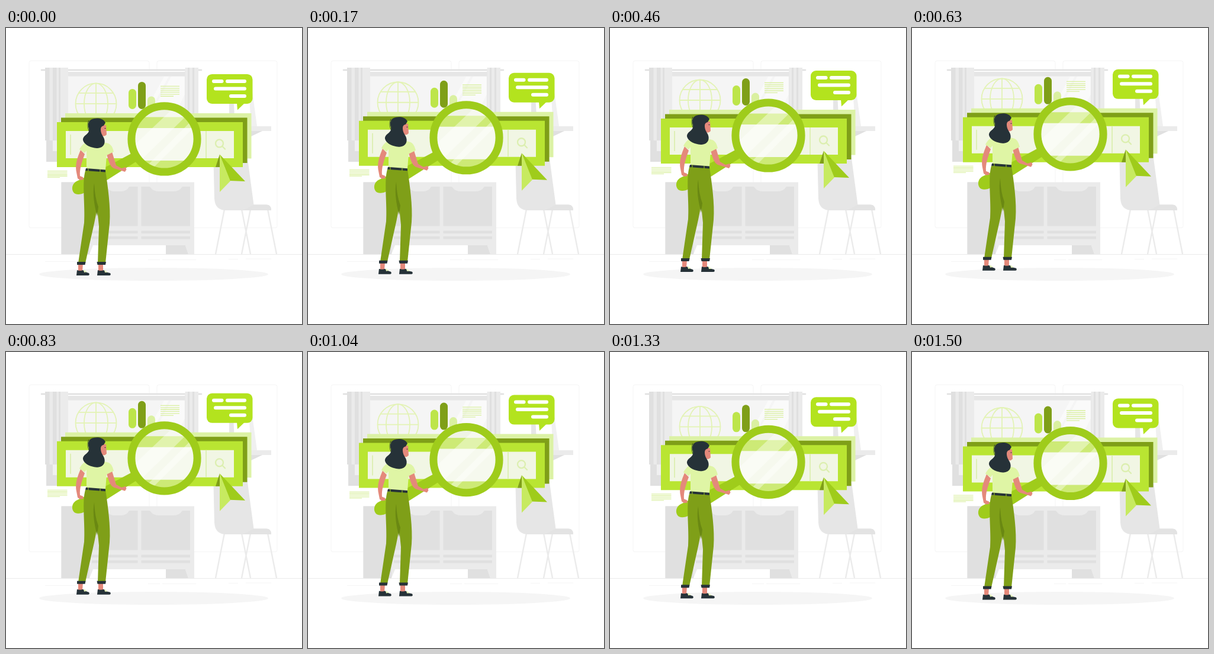
An HTML page for the animation above (1.54 s loop, 500x500 px).

```html
<!DOCTYPE html>
<html lang="en">
<head>
<meta charset="utf-8">
<title>Search illustration</title>
<style>
html, body { margin: 0; width: 100%; height: 100%; overflow: hidden; background: #fff; }
svg { display: block; width: 100vw; height: 100vh; }
</style>
</head>
<body>
<svg viewBox="0 0 500 500">
  <defs>
    <clipPath id="lens"><circle cx="267.5" cy="187.5" r="50"/></clipPath>
  </defs>

  <g id="room">
    <g fill="none" stroke="#f5f5f5">
      <rect x="39" y="55.5" width="203" height="282" rx="3"/>
      <rect x="255" y="55.5" width="203" height="282" rx="3"/>
      <path d="M66 394.5h52M240 391.5h20M264 391.5h57M376 390.5h16M405 390h43"/>
    </g>
    <path d="M0 382.5H500" stroke="#ebebeb"/>

    <g id="window">
      <path d="M68 73H325V226H68z" fill="#e0e0e0"/>
      <path d="M79 190h24v18H79z" fill="#f0f0f0"/>
      <path d="M105 73H302V82H105z" fill="#e6e6e6"/>
      <path d="M105 81.500H302V220H105z" fill="#f5f5f5"/>
      <path d="M267 82h8l-60 110h-8zM279 82h23v30l-40 80h-43z" fill="#fafafa"/>
      <path d="M105 72.500H302V74H105z" fill="#fff"/>
      <path d="M60 71H330" stroke="#e0e0e0" stroke-width="2.600" stroke-linecap="round"/>
      <path d="M66 67h39v123H66zM302.500 67H325v123h-22.500z" fill="#ebebeb"/>
      <path d="M66 67h7.500v123H66zM79 67h6.500v123H79zM89 67h3v123h-3zM307 67h3v123h-3zM315 67h3v123h-3z" fill="#e0e0e0"/>
    </g>

    <g id="shelf">
      <path d="M377 110h7l2 40h-9z" fill="#e6e6e6"/>
      <path d="M410 100h5l9 66h-10z" fill="#f0f0f0"/>
      <path d="M405 166h43v8h-43z" fill="#ebebeb"/>
      <path d="M405 174h28l-19 9h-9z" fill="#e0e0e0"/>
    </g>

    <g id="cabinet">
      <path d="M93.500 260.500H318V382h-10l-5-15H147l-6 15H93.500z" fill="#ebebeb"/>
      <path d="M93.500 260.500H141V382H93.500zM270 367h33l5 15h-38z" fill="#e0e0e0"/>
      <path d="M141 268h28q5 8 14 8h11q10 0 14-8h14.500v66.500H141zM228.500 268H243q5 8 15 8h25q10 0 15-8h13v66.500h-82.500z" fill="#e0e0e0"/>
      <path d="M145 342.500h77.500v4.500H145zM145 352h77.500v4.500H145zM228.500 342.500H311v4.500h-82.500zM228.500 352H311v4.500h-82.500z" fill="#e0e0e0"/>
    </g>

    <g id="chair">
      <path d="M369 306L354 382M398 306L413 382M413 306L398 382M442 306L457 382" stroke="#ebebeb" stroke-width="2.400"/>
      <path d="M350 205H406L418.500 298.500H440q8 0 8 9.500H372Q353 308 352 288z" fill="#e6e6e6"/>
      <path d="M418.500 298.500H440q8 0 8 9.500H400z" fill="#e3e3e3"/>
    </g>
    <ellipse cx="249.500" cy="416" rx="193.500" ry="11" fill="#f5f5f5"/>
  </g>

  <g id="float">
    <g fill="none" stroke="#e3f3b5" stroke-width="1.800">
      <circle cx="152" cy="128" r="34.500"/>
      <ellipse cx="152" cy="128" rx="20" ry="34.500"/>
      <path d="M152 93.500v69M117.500 128h69M123 110h58"/>
    </g>
    <rect x="207" y="103" width="13" height="34" rx="6.500" fill="#bde54a"/>
    <rect x="223" y="91" width="13" height="46" rx="6.500" fill="#7f9f18"/>
    <rect x="239" y="115.500" width="13" height="40" rx="6.500" fill="#daf0a0"/>
    <path d="M261 98.500h32M261 102h32M261 105.200h32M261 108.500h32M261 112h32M261 115.300h22" stroke="#d9efa0" stroke-width="1.300"/>
    <path d="M70 241.500h33.500M70 243.800h33.500M70 246h33.500M70 248.200h33.500M70 250.400h33.500M70 252.500h21" stroke="#d9efa0" stroke-width="1.100"/>

    <g id="search-bars">
      <path d="M100 144h314.500v76.500H100z" fill="#dcf2a5"/>
      <path d="M93 151.500h314.500V228H93z" fill="#7f9f18"/>
      <path d="M86 159h314v76H86z" fill="#b9e532"/>
      <path d="M101 174h284v46H101z" fill="#f1f6e4"/>
      <path d="M109 180v34M338 174v46" stroke="#dcefb0" stroke-width="1.800"/>
      <g fill="none" stroke="#dcefb0" stroke-width="2.300" stroke-linecap="round">
        <circle cx="360.500" cy="195" r="6.500"/>
        <path d="M365.500 200l4.500 4.500"/>
      </g>
    </g>

    <g id="magnifier">
      <path d="M221 207L180 229 119 259C110 264 110 276 117 280 121 282 128 281 133 278L172 256 224 223z" fill="#9fcc1b"/>
      <g clip-path="url(#lens)">
        <path d="M217 137h101v101H217z" fill="#eff3e5"/>
        <path d="M217 150.500h101V238H217z" fill="#cdea76"/>
        <path d="M217 169h101v55H217z" fill="#f6f9ee"/>
        <path d="M282 136l22 13-85 83-16-21zM312 158l7 8-72 72-8-6z" fill="#fff" opacity=".4"/>
      </g>
      <circle cx="267.500" cy="187.500" r="55.600" fill="none" stroke="#9fcc1b" stroke-width="13"/>
    </g>

    <g id="pointer">
      <path d="M361 213.500L354 235h8z" fill="#7f9f18"/>
      <path d="M361 213.500L404 259 378 258z" fill="#9fcc1b"/>
      <path d="M361 213.500L379 258.500 361 277z" fill="#c7ea60"/>
    </g>

    <g id="bubble">
      <rect x="339" y="78" width="77.500" height="50" rx="9" fill="#b3e31e"/>
      <path d="M390 127l1 11.500L403 127z" fill="#b3e31e"/>
      <path d="M351 90h13.500M374 90h29M354 102.500h49M380 115h23" stroke="#fff" stroke-width="6" stroke-linecap="round"/>
    </g>

    <g id="woman">
      <path d="M122 398h8l-1 13h-7zM156 398h8v13h-8z" fill="#e4897b"/>
      <path d="M120 409q5 2 10 0 3 3 10 5 2 3-1 4h-20zM155 409q5 2 10 0 4 4 11 5 2 3-1 4h-21z" fill="#263238"/>
      <path d="M131 408l6 4-5 1zM166 408l6 5-5 0z" fill="#e5f5bd"/>
      <path d="M134 241H168C172 268 177 302 175 330L168 397H155L157 335 154 305 149 330 134 397H122L132 329C134 300 128 262 134 241z" fill="#7f9f18"/>
      <path d="M149 262Q145 285 154 318L156 302Q150 286 149 262z" fill="#6a8812"/>
      <path d="M120 395h14.500l-1 5H120zM153.500 395H169l-1 5h-13.500z" fill="#263238"/>
      <path d="M126 206C121 218 117 229 118.500 241L121 254 125 257 131 256 130 252 125 250C124 238 128 227 133 213z" fill="#e4897b"/>
      <path d="M170 213C173 225 176 234 182 237L195 241 201 243 203.500 239 202 235 195 237 186 232 179 209z" fill="#e4897b"/>
      <path d="M135 193Q128 197 124 205L133 211 136 207V240H168L170 215 182 209Q179 197 173 195L161 192z" fill="#dff5a5"/>
      <path d="M159 163L169 164 170 180Q167 184 161 182L160 193Q151 199 146 191z" fill="#e4897b"/>
      <path d="M168 160C164 152 154 152 149 153 140 154 137 162 140 170 142 180 130 180 130 189 132 198 145 203 155 203 166 202 169 193 165 185 162 180 160 177 160 171Q160 166 165 165z" fill="#263238"/>
      <path d="M140 156Q136 164 140 174" fill="none" stroke="#263238" stroke-width=".800"/>
      <path d="M166.500 169.500h2" stroke="#263238"/>
      <path d="M135 237L168 239.500V243.500L134 241z" fill="#263238"/>
      <path d="M139 237.200v4.500M159 239v4.500" stroke="#9fcc1b"/>
    </g>
  </g>
</svg>
<script>
const LOOP = 1540, RISE = 10, LOWEST = 0.5, LEAD = 40;
const floating = document.getElementById('float');
const start = performance.now();

// Linear bob: up for half the loop, then back down.
function draw(now) {
  const phase = ((Math.max(0, now - start) + LEAD) % LOOP) / LOOP;
  const height = 1 - Math.abs(1 - 2 * phase);
  floating.setAttribute('transform', `translate(0 ${LOWEST - RISE * height})`);
  requestAnimationFrame(draw);
}
draw(start);
</script>
</body>
</html>
```
